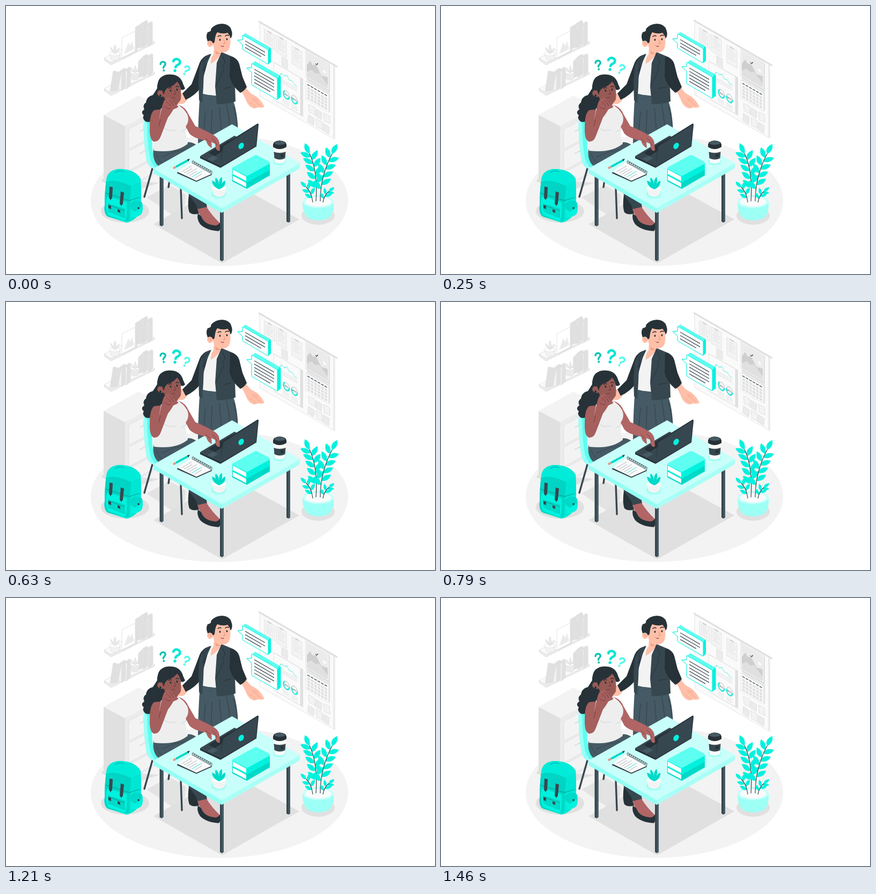
Animation of 800 by 500 pixels, one loop 1.5 s. Source, as an HTML page:

```html
<!DOCTYPE html>
<html lang="en">
<head>
<meta charset="utf-8">
<title>Study help</title>
<style>
html, body { margin: 0; width: 100%; height: 100%; overflow: hidden; background: #fff }
svg { display: block; width: 100vw; height: 100vh }
.ink { fill: #263238 } .slate { fill: #37474f } .steel { fill: #455a64 }
.mint { fill: #00f2de } .teal { fill: #00d9c8 } .aqua { fill: #5cfff0 } .pale { fill: #c8fffa } .ice { fill: #9dfff5 }
.skin { fill: #ffbfa8 } .brown { fill: #985955 } .arm { fill: #b16565 }
.w { fill: #fff } .g0 { fill: #fafafa } .g1 { fill: #f3f3f3 } .g2 { fill: #ebebeb } .g3 { fill: #e0e0e0 } .g4 { fill: #cfcfcf }
.line { fill: none; stroke: #263238; stroke-width: 1; stroke-linecap: round; stroke-linejoin: round }
.edge { stroke: #dedede; stroke-width: .8 }
</style>
</head>
<body>
<svg viewBox="0 0 800 500">
<ellipse class="g1" cx="398" cy="363" rx="240" ry="122"/>
<path class="g3" d="M275 407 418 327 547 398 403 480Z"/>
<path class="g3" d="M262 357 305 334 336 352 330 398 318 395Z" opacity=".8"/>

<!-- shelves -->
<g id="shelves"></g>
<g class="edge">
  <path class="g1" d="M193 89h20l-2 10q-8 5-15 0Z"/><ellipse class="w" cx="203" cy="89" rx="10" ry="4"/>
  <path class="g2" d="M202 89q-7-5-7-12 6 4 7 10-2-9 1-15 4 6 2 15 2-6 6-9 0 8-7 11Z"/>
  <path class="g3" d="M217 60 242 47 244 48V84L219 97Z"/><path class="w" d="M216 59 241 47V84L216 97Z"/>
  <path class="g2" stroke="none" d="M220 90 228 68 232 74 235 65 239 80Z"/>
  <path class="g2" d="M232 124h17l-2 12q-7 4-13 0Z"/><ellipse class="w" cx="240" cy="124" rx="8" ry="3"/>
  <path class="g2" d="M240 125q-7-4-7-10 5 2 6 8 0-8 2-12 3 5 1 12 2-5 6-7 0 7-8 9Z"/>
</g>

<!-- cabinet -->
<path class="g3" d="M177 326 182 322 286 330 222 351Z"/>
<path class="g3" d="M182 203 222 224V344L182 324Z"/>
<path class="g2" d="M222 224 288 189V310L222 344Z"/>
<path class="g1" d="M182 203 247 167 288 189 222 224Z"/>
<g class="g1 edge"><path d="M229 230 282 201V239L229 267Z"/><path d="M229 271 282 242V279L229 307Z"/><path d="M229 311 282 283V308L229 337Z"/></g>
<path class="line" style="stroke:#dedede;stroke-width:2" d="M250 234 263 227M250 275 263 268"/>

<!-- floating parts -->
<g id="floating">
  <g transform="translate(473 31) skewY(30)">
    <rect class="g0 edge" width="140" height="137"/>
    <rect class="g2" x="137" width="3.5" height="137"/>
    <rect class="g3" x="-2" y="-3" width="147" height="3.5" rx="1"/>
    <g id="board"></g>
  </g>
  <g id="bubbles"></g>
  <g id="questions"></g>
</g>

<!-- backpack -->
<ellipse class="g3" cx="222" cy="383" rx="45" ry="21"/>
<path fill="#00e6d4" d="M187 324Q189 306 211 304 240 304 251 322 253 345 251 384 240 402 224 404L190 393Q182 388 184 372 184 345 187 324Z"/>
<path fill="#00d4c4" d="M187 326Q206 322 233 336L229 402 190 393Q182 388 184 372 184 345 187 326Z"/>
<path fill="#00ecd9" d="M187 328Q189 305 212 304 239 305 251 323 248 331 232 335 204 322 187 328Z"/>
<path class="mint" d="M188 355 225 366Q227 390 222 401L190 390Q184 374 188 355Z"/>
<path class="teal" d="M190 368 222 378V396L191 384Z"/>
<path class="line" style="stroke:#009f94" d="M191 371 221 382M186 349 230 363 249 357M203 311Q211 305 220 309"/>
<path class="slate" d="M193 337 199 338 198 358 195 362 192 358ZM214 346 220 348 218 369 215 373 212 369Z"/>
<path class="slate" d="M191 371 196 373V379L191 377ZM208 379 213 381V386L208 384Z"/>
<path class="mint" d="M232 369Q242 358 254 367 257 381 252 389 242 396 233 394Z"/>
<path class="teal" d="M232 369Q242 358 254 367L253 376 240 384 232 378Z"/><circle class="ink" cx="247" cy="377" r="1.8"/>

<!-- chair -->
<path class="line" style="stroke-width:3.4;stroke:#37474f" d="M273 303 258 356M305 325 303 338M326 340 328 396"/>
<path class="aqua" d="M259 211Q255 216 257 236 258 270 263 291 267 304 287 307L296 296Q276 291 273 268L271 214Z"/>
<path class="pale" d="M259 211Q262 211 263 222 264 265 269 287 273 300 287 307 267 304 263 291 257 262 257 230 255 216 259 211Z" opacity=".6"/>

<!-- standing woman -->
<path class="steel" d="M362 163 422 172Q432 195 433 240L400 255 358 266Q358 210 362 163Z"/>
<path class="line" style="stroke:#37474f;stroke-width:1.4" d="M372 198Q369 225 369 252M384 194Q383 220 383 245M398 190Q400 212 402 236M411 184Q416 205 417 226M424 188Q430 205 431 225"/>
<path class="g1" d="M372 96 404 88 398 166Q380 168 366 163Z"/>
<path class="skin" d="M388 78 387 90Q381 98 382 108 394 101 403 87L405 80Z"/>
<path fill="#f29f88" d="M390 83Q396 89 403 88L392 90Z"/>
<path class="skin" d="M336 164Q326 161 321 168L312 177Q312 183 318 182L329 183Q336 180 339 173Z"/>
<path class="ink" d="M380 90Q366 94 361 106L346 146 329 163 335 175Q353 167 364 151L370 126Z"/>
<path class="slate" d="M383 89Q366 94 361 114L359 142 360 176 366 180 368 150 369 120Z"/>
<path class="slate" d="M402 86 421 94Q434 98 433 116L427 148 428 178Q412 184 393 183L390 150 393 106Z"/>
<path class="line" d="M401 89 409 105 403 112 407 117 392 148M381 92 368 104 371 110 366 122M406 154 419 151M427 122 428 151"/>
<path class="skin" d="M438 157 447 151Q454 163 462 166 474 172 482 188 478 191 471 189L464 191Q452 190 446 172Z"/>
<path class="line" style="stroke:#f29f88" d="M460 175Q468 179 474 186M455 180Q462 184 466 189M460 172 468 176"/>
<path class="ink" d="M418 94Q432 97 435 108L441 132 449 151Q445 158 437 162 421 149 417 132Z"/>
<path class="skin" d="M386 62Q386 47 400 45 416 45 418 60 420 78 413 84 407 88 398 86L390 83Q386 76 386 68Z"/>
<ellipse class="skin" cx="380.5" cy="70" rx="5.5" ry="6.5"/>
<path class="ink" d="M376 66Q372 56 376 49 384 47 382 43 390 33 403 33 417 34 420 44 424 54 419 61 417 54 413 50 404 53 394 49 390 54 389 67L386 70Q383 62 376 66Z"/>
<path class="line" d="M395 57Q398 54 401 56M409 56Q412 53 415 55" style="stroke-width:1.6"/>
<ellipse class="ink" cx="399" cy="63" rx="1.4" ry="1.9"/><ellipse class="ink" cx="412" cy="62" rx="1.4" ry="1.9"/>
<path class="line" style="stroke:#e78b74" d="M406 63 409 70 405 70M378 68Q381 67 382 72"/>
<path fill="#a24c45" d="M399 73Q403 76 407 74 405 79 399 73Z"/>

<!-- seated woman -->
<path class="ink" d="M283 152Q281 132 300 128 325 126 330 145L310 185 292 194Q288 206 280 210 273 218 261 216 253 210 257 204 250 198 258 193 254 185 261 180 262 169 274 166Z"/>
<path class="steel" d="M275 266Q310 276 340 254 354 254 362 268L295 306Q271 295 275 266Z"/>
<path class="line" style="stroke:#37474f" d="M290 282Q315 268 344 268M280 275Q283 287 293 296"/>
<path class="brown" d="M298 175 299 191Q312 203 322 188L319 174Z"/>
<path fill="#eee" d="M289 191Q297 191 299 186 309 198 320 183 335 190 340 207 342 216 337 225 333 237 339 257 317 275 276 270 272 258 279 238L284 212Z"/>
<path class="line" style="stroke:#d2d2d2" d="M293 225Q300 236 317 231M337 225Q334 232 327 234"/>
<path class="brown" d="M291 158Q298 138 322 139 328 158 326 174 322 184 311 185 299 182 294 169 284 171 282 163 283 155 291 158Z"/>
<path class="ink" d="M282 157Q280 134 301 128 320 126 327 139 332 149 334 154 330 158 326 156 325 147 319 141 312 150 303 152 296 155 294 166L291 157Q287 153 282 157Z"/>
<circle class="ink" cx="288" cy="167" r="2"/>
<path class="line" d="M303 154Q306 151 309 153M317 151Q319 148 322 151" style="stroke-width:1.4"/>
<ellipse class="ink" cx="307" cy="158" rx="1.6" ry="2"/><ellipse class="ink" cx="319" cy="156" rx="1.6" ry="2"/>
<path class="line" style="stroke:#6f3939" d="M314 157 317 164 312 165M308 172Q311 169 315 171"/>
<path fill="#a55f5d" d="M277 194Q268 199 268 226 267 250 276 253 285 254 289 242L302 208Q309 199 312 193L321 189Q321 185 315 183L309 177Q308 170 301 171 294 173 291 188L285 214 289 193Z"/>
<path class="line" style="stroke:#743e3e" d="M300 179 308 187M305 176 313 186M296 188Q301 193 307 191M288 212 285 224"/>
<path class="slate" d="M339 345 373 364 375 376Q362 383 354 377 344 366 339 345Z"/>
<path class="ink" d="M341 352Q338 375 342 385 349 391 360 387L355 372Z"/>
<path class="arm" d="M357 379 374 375Q384 391 399 405L390 413Q367 407 357 379Z"/>
<path class="ink" d="M358 387Q355 397 362 407 374 419 397 420 402 414 399 404 395 411 387 409 370 407 364 392Z"/>

<!-- table -->
<g id="legs"></g>
<path fill="#93fff3" d="M275 303 402 376V386L277 313Q275 311 275 303Z"/>
<path fill="#a8fff6" d="M402 376 548 293Q549 301 546 304L402 386Z"/>
<path class="pale" d="M277 302 419 222Q421 220 424 222L547 292Q549 294 546 295L404 376Q402 377 400 376L277 305Q275 303 277 302Z"/>

<!-- laptop -->
<path class="ink" d="M362 280 400 298V302L362 284Z"/><path class="slate" d="M362 280 426 242 441 249 401 299Z"/>
<path class="ink" d="M378 274 421 248 432 253 389 280Z"/><path class="steel" d="M375 285 387 279 396 284 384 290Z"/>
<path class="ink" d="M404 260 468 220Q471 218 471 222L467 262 400 302Z"/>
<path class="slate" d="M405 262 468 222Q470 221 469.5 224L466 261 400 300Z"/>
<ellipse class="mint" cx="438.5" cy="261" rx="4.6" ry="6.4" transform="rotate(32 438.5 261)"/>
<path class="arm" d="M320 184Q335 188 341 203L353 224Q372 232 386 240 398 247 398 257L399 269Q395 273 391 265L390 257 383 254 384 265Q376 262 373 251 350 247 342 238L335 225Q343 214 338 202 331 190 320 184Z"/>
<path class="line" style="stroke:#7d4343" d="M384 247Q390 250 393 260M373 247 380 255"/>

<!-- notebook and pencil -->
<path class="slate" d="M319 310 384 313V315L355 328 319 312Z"/><path class="g0" d="M319 309 347 290 384 313 355 326Z"/>
<g id="notes"></g>
<path class="line" style="stroke:#00d9c8;stroke-width:4;stroke-linecap:butt" d="M317 300 339 288"/>
<path class="ink" d="M338 286 343 285 340 290Z"/><path class="line" style="stroke:#f28f7c;stroke-width:4" d="M313.5 302 315 301"/>

<!-- cactus -->
<ellipse class="ice" cx="397" cy="351" rx="14" ry="8"/><path class="g1" d="M384 339H410L408 352Q397 360 387 352Z"/><ellipse class="w" cx="397" cy="339" rx="13" ry="5"/>
<path class="teal" d="M397 342Q385 337 384 326 392 327 395 336 388 326 391 320 397 324 397 334 397 322 402 319 405 326 400 336 403 327 409 326 410 338 397 342Z"/>

<!-- books -->
<g id="books"></g>

<!-- cup -->
<ellipse class="ice" cx="510" cy="290" rx="12" ry="7"/>
<path class="g0" d="M499 264H522L520 291Q510 297 501 291Z"/><path class="slate" d="M499.5 272Q510 276 521.5 272L520.5 284Q510 289 500.5 284Z"/>
<circle class="ink" cx="515" cy="279" r="3"/>
<path class="ink" d="M498 258V263Q510 271 523 263V258L521 254Q510 248 500 254Z"/><ellipse class="steel" cx="510.5" cy="255.5" rx="10" ry="3.6"/>

<!-- plant -->
<ellipse class="g3" cx="582" cy="391" rx="31" ry="17"/>
<path class="ice" d="M553 365H611Q612 389 601 396 582 404 564 396 553 389 553 365Z"/><ellipse class="pale" cx="582" cy="365" rx="29" ry="12"/><ellipse class="g0" cx="582" cy="365" rx="24" ry="9"/>
<g id="plant"></g>
</svg>
<script>
const put = (id, html) => document.getElementById(id).innerHTML = html;
const each = (n, f) => Array.from({ length: n }, (_, i) => f(i)).join('');
const path = (cls, d, more = '') => `<path class="${cls}" d="${d}" ${more}/>`;
const rect = (cls, x, y, w, h, more = '') => `<rect class="${cls}" x="${x}" y="${y}" width="${w}" height="${h}" ${more}/>`;
const rule = (x, y, w, more = 'stroke="#dedede"') => `<path d="M${x} ${y}h${w}" ${more}/>`;

// Upright book seen from its spine corner
const upright = (x, y, w, h) =>
  path('g3 edge', `M${x} ${y}l${w} -6l3 1v${h}l${-w} 7Z`) + path('g1 edge', `M${x} ${y}l4 2l-1 ${h}l-5 -3Z`);
put('shelves', [97, 154].map(y =>
  path('g2 edge', `M183 ${y}v4l13 9l81 -40v-4Z`) + path('g0 edge', `M183 ${y}L264 ${y - 41}L277 ${y - 29}L196 ${y + 8}Z`)).join('') +
  upright(262, 35, 8, 39) + upright(252, 33, 9, 43) + path('g3 edge', 'M241 40 254 32 257 76 244 79Z') +
  upright(263, 95, 8, 34) + upright(254, 96, 8, 35) + path('g3 edge', 'M247 103 258 92 258 130 246 134Z') +
  upright(222, 120, 7, 33) + upright(212, 122, 8, 34) + path('g3 edge', 'M200 121 215 124 208 157 194 160Z'));

const sheet = (x, y, h) => rect('g1 edge', x, y, 19, h) + rect('g4', x + 6, y - 1, 7, 2.5) +
  each(5, i => rule(x + 3, y + 6 + i * 4, i % 3 ? 13 : 9));
const donut = (x, y, share, label) => {
  const ring = `<ellipse cx="${x}" cy="${y}" rx="5.4" ry="7.2" pathLength="100"`;
  return `<g fill="none" stroke-width="2.4">${ring} stroke="#dedede"/>${ring} stroke-dasharray="${share} 100" stroke="#2ceadb"/></g>
  <text x="${x}" y="${y + 1.3}" font-family="Inter, sans-serif" font-size="3.4" font-weight="700" text-anchor="middle" fill="#37474f">${label}</text>`;
};
put('board',
  sheet(9, 7, 28) + sheet(31, 6, 31) + sheet(60, 9, 33) + rect('g2 edge', 41, 40, 11, 16) +
  rect('g3', 28, 58, 53, 71) + rect('g0 edge', 26, 59, 50, 69) +
  '<path d="M37 77l4 -6 5 2 5 -4 4 6 6 -1 4 4 5 1" fill="none" stroke="#5cebdf" stroke-width="1"/>' +
  each(3, i => rule(38, 82 + i * 3, 32)) + donut(50, 106, 65, '75%') + donut(65, 106, 55, '60%') +
  each(3, i => rule(43, 118 + i * 3, 12) + rule(59, 118 + i * 3, 12)) +
  rect('g3', 88, 3, 43, 53) + rect('g1 edge', 86, 2, 43, 50) + rect('g2', 88, 4, 39, 46) +
  '<path class="g4" d="M88 28l6 -11 5 5 6 -4 10 14 12 -3V50H88Z"/><path class="g3" d="M88 41l9 -9 7 3 7 -5 16 13V50H88Z"/>' +
  '<circle class="g0" cx="121" cy="22" r="3"/>' + path('line', 'M104 16.5l2 1 2.5 -4') +
  rect('g3', 88, 57, 43, 34) + rect('g0 edge', 86, 59, 43, 34) +
  each(6, i => rule(89 + i * 6.4, 64, 4.5, 'stroke="#37474f" stroke-width="1.5"')) +
  each(24, i => rect('g3', 89 + i % 6 * 6.4, 68 + (i / 6 | 0) * 6, 4.8, 4.5)) +
  each(6, i => {
    const x = 91 + i % 3 * 14, y = 100 + (i / 3 | 0) * 19;
    return rect(i % 2 ? 'g2' : 'g1', x, y, 11, 14, `transform="rotate(${i % 2 ? 5 : -6} ${x} ${y})" stroke="#dedede" stroke-width=".8"`);
  }));

const bubble = (x, y, h, tail, rows, depth) =>
  `<g transform="translate(${x} ${y}) skewY(30)">
  ${path('mint', `M0 2L${depth} ${-depth - 1}H${46 + depth}q2 0 2 2V${h - depth - 2}L48 ${h}Z`)}
  ${path('aqua', `M0 2L${depth} ${-depth - 1}H${46 + depth}L48 1Z`)}
  <path class="w" stroke="#2cf0e2" stroke-width="1.3" stroke-linejoin="round" d="M2 0H46q2 0 2 2V${h - 2}q0 2 -2 2H2q-2 0 -2 -2V${tail + 9}L-9 ${tail + 6}L0 ${tail}V2q0 -2 2 -2Z"/>
  ${each(rows, i => rule(5, 8 + i * 6.2, i == rows - 1 ? 30 : 37, 'stroke="#37474f" stroke-width="1.4"'))}</g>`;
put('bubbles', bubble(441, 54, 27, 9, 3, 5) + bubble(458, 107, 40, 8, 5, 6.5));

const question = (x, y, size, turn, color) =>
  `<g transform="translate(${x} ${y}) rotate(${turn}) scale(${size})">
  <path d="M-5.5 -5C-5 -11.5 6 -11.5 6 -4.5C6 0 0 -.5 0 4.5" fill="none" stroke="${color}" stroke-width="4.2" stroke-linecap="round"/>
  <circle cy="10.5" r="2.5" fill="${color}"/></g>`;
put('questions', question(293, 112, .8, -8, '#00c2b2') + question(317, 109.5, 1.08, 10, '#00e6d3') + question(336, 119.5, .78, 26, '#4dfaec'));

put('legs', [[286.5, 316, 410], [523, 308, 403], [399, 382, 475]].map(([x, top, end]) =>
  path('slate', `M${x} ${top}h7v${end - top - 1}l-3.5 2l-3.5 -2Z`) +
  path('steel', `M${x + 3.5} ${top}h3.5v${end - top - 1}l-3.5 2Z`)).join(''));

put('notes', each(10, i => path('line', `M${348 + i * 3.7} ${294 + i * 2.05}q-2 -5 1 -5q3 1 1 5`)) +
  each(6, i => path('line', `M${328 + i * 4.6} ${309 + i * 2.5}l${i % 2 ? 14 : 18} ${i % 2 ? -8 : -10.5}`,
    `style="stroke:${i == 4 ? '#00d9c8' : '#9aa5aa'};stroke-width:.8"`)));

// Closed book lying on the table, pages facing left
const book = (x, y, side, top) => `<g transform="translate(${x} ${y})">` +
  path(side, 'M0 0L27 15L70 -9V2L27 27L0 13Z') +
  path('w', 'M1 2.5L26 16V24L1 11Z') +
  path(top, 'M0 -1L42 -24Q44 -25 46 -24L69 -12Q71 -10 69 -8L27 15L0 1Z') + '</g>';
put('books', book(422, 314, 'teal', 'mint') + book(422, 302.5, 'mint', 'aqua'));

// Leaves alternate left and right along a quadratic stem, with one at the tip
const leaf = (x, y, angle, len) => path('mint',
  `M0 0Q${len * .4} ${-len * .48} ${len} 0Q${len * .5} ${len * .4} 0 0`,
  `transform="translate(${x} ${y}) rotate(${angle})"`);
const stem = (x0, y0, x1, y1, x2, y2, leaves, len) => {
  const mix = (a, b, c, t) => (1 - t) ** 2 * a + 2 * t * (1 - t) * b + t * t * c;
  return each(leaves, i => {
    const t = .25 + .75 * i / (leaves - 1), u = 1 - t;
    const heading = Math.atan2(u * (y1 - y0) + t * (y2 - y1), u * (x1 - x0) + t * (x2 - x1)) * 180 / Math.PI;
    const turn = i == leaves - 1 ? 0 : i % 2 ? 48 : -48;
    return leaf(mix(x0, x1, x2, t), mix(y0, y1, y2, t), heading + turn, len);
  }) + path('line', `M${x0} ${y0}Q${x1} ${y1} ${x2} ${y2}`, 'style="stroke:#37474f;stroke-width:1.2"');
};
put('plant', stem(578, 364, 582, 310, 566, 275, 10, 21) + stem(586, 364, 586, 318, 608, 276, 10, 21) +
  stem(572, 366, 570, 348, 560, 338, 5, 15) + stem(591, 366, 594, 352, 602, 346, 5, 13));

const floating = document.getElementById('floating');
function draw(now) {
  const lift = 4.4 * (1 - Math.cos(now / 1500 * 2 * Math.PI));
  floating.setAttribute('transform', `translate(0 ${-lift})`);
  requestAnimationFrame(draw);
}
draw(performance.now());
</script>
</body>
</html>
```
